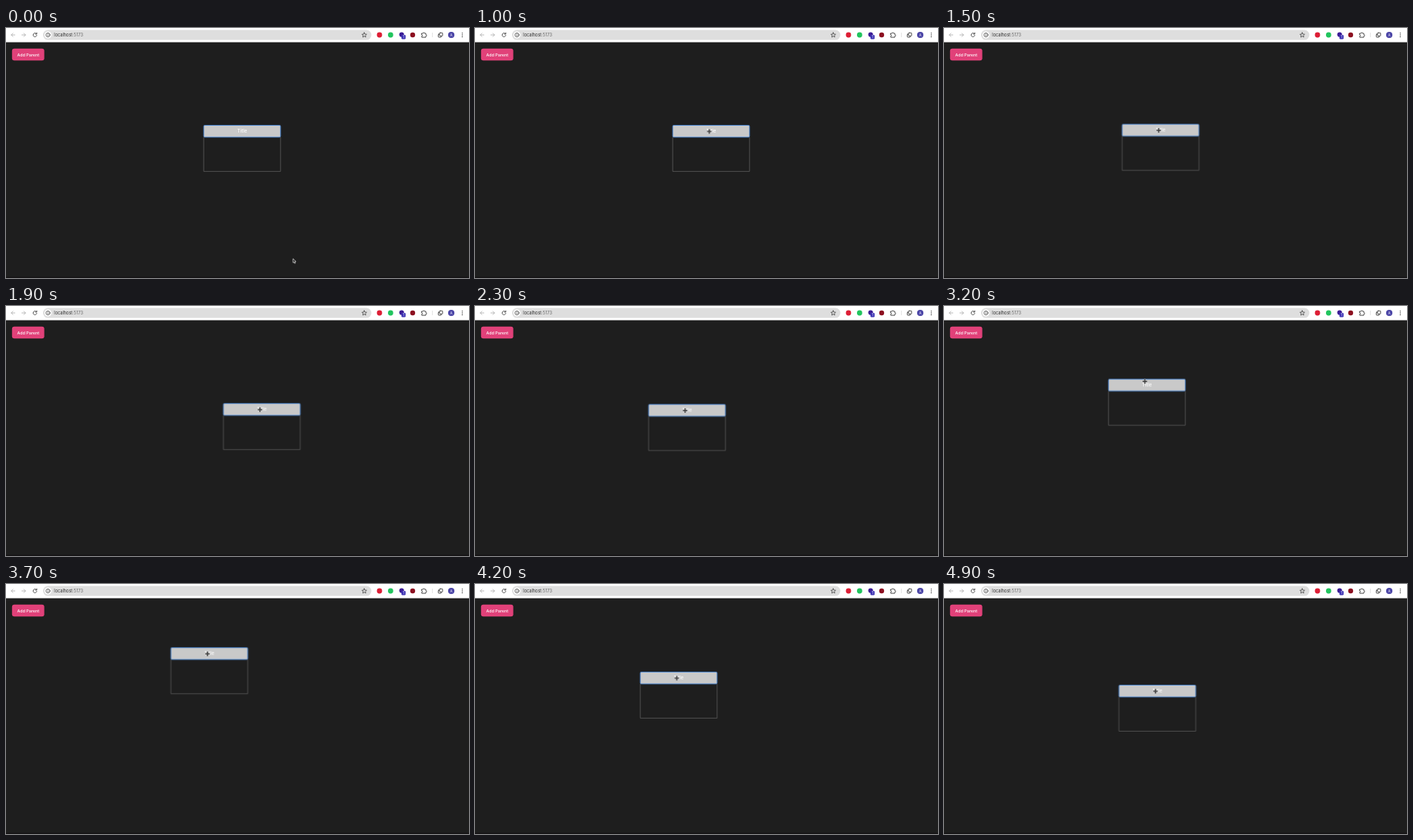
An HTML page for the animation above (5 s loop, 600 by 325 pixels).

```html
<!DOCTYPE html>
<html lang="en">
<head>
<meta charset="utf-8">
<title>Draggable panel</title>
<style>
  html, body { margin: 0; width: 100%; height: 100%; overflow: hidden; background: #1e1e1e; }
  svg { display: block; width: 600px; height: 325px; }
  text { font-family: Inter, Roboto, sans-serif; }
  .line { fill: none; stroke: #3c3c3c; stroke-width: .9; stroke-linecap: round; stroke-linejoin: round; }
  .faint { stroke: #b4b4b4; }

  #panel { animation: drag 5s infinite; }
  #arrow { animation: approach 5s infinite, leave 5s step-end infinite; }
  #grip { animation: hold 5s step-end infinite; }

  @keyframes drag {
    0%   { transform: translate(256px, 126.3px); animation-timing-function: step-end; }
    22%  { transform: translate(256px, 126.3px); animation-timing-function: steps(4); }
    30%  { transform: translate(230.6px, 124.9px); animation-timing-function: step-end; }
    32%  { transform: translate(230.6px, 124.9px); animation-timing-function: steps(3); }
    38%  { transform: translate(281.5px, 126.5px); animation-timing-function: steps(3); }
    44%  { transform: translate(224.7px, 127.7px); animation-timing-function: step-end; }
    46%  { transform: translate(224.7px, 127.7px); animation-timing-function: steps(5); }
    56%  { transform: translate(214.7px, 105.7px); animation-timing-function: steps(2); }
    60%  { transform: translate(212.9px, 99.3px); animation-timing-function: step-end; }
    64%  { transform: translate(212.9px, 94.9px); animation-timing-function: steps(1); }
    66%  { transform: translate(213px, 89.5px); animation-timing-function: steps(4); }
    74%  { transform: translate(213.5px, 82.5px); animation-timing-function: steps(5); }
    84%  { transform: translate(213.9px, 114.2px); animation-timing-function: steps(1); }
    86%  { transform: translate(214.2px, 114.8px); animation-timing-function: steps(6); }
    98%, 100% { transform: translate(226.5px, 131.2px); }
  }
  @keyframes approach {
    0%  { transform: translate(372px, 299.8px); animation-timing-function: steps(2); }
    4%  { transform: translate(325.6px, 207.6px); animation-timing-function: step-end; }
    6%  { transform: translate(325.6px, 207.6px); animation-timing-function: steps(4); }
    14%, 100% { transform: translate(303.5px, 134.5px); }
  }
  @keyframes leave {
    0% { opacity: 1; }
    14%, 100% { opacity: 0; }
  }
  @keyframes hold {
    0%  { opacity: 0; transform: translate(47.6px, 8.2px); }
    14% { opacity: 1; transform: translate(47.6px, 8.2px); }
    64% { opacity: 1; transform: translate(47.4px, 3.1px); }
    66%, 100% { opacity: 1; transform: translate(47.6px, 8.2px); }
  }
</style>
</head>
<body>
<svg viewBox="0 0 600 325">
  <rect width="600" height="325" fill="#1e1e1e"/>
  <rect y="323.5" width="600" height="1.5" fill="#151314"/>

  <!-- Browser toolbar -->
  <rect width="600" height="18.5" fill="#fff"/>
  <rect x="48" y="2.6" width="425.5" height="13" rx="6.5" fill="#dedede"/>
  <path class="line faint" d="M11.5 9H6.8M8.9 6.9 6.8 9l2.1 2.1M20.6 9h4.7M23.2 6.9 25.3 9l-2.1 2.1"/>
  <path class="line" d="M39.3 7.3A2.4 2.4 0 1 0 39.9 9.6M39.9 6.2v1.7h-1.7"/>
  <circle cx="54.4" cy="9" r="4.6" fill="#fff"/>
  <circle class="line" cx="54.4" cy="9" r="2.6" style="stroke-width:.75"/>
  <path class="line" d="M54.4 8.9v1.3M54.4 7.6v.05" style="stroke-width:.75"/>
  <text x="62.3" y="11.1" font-size="5.6" fill="#2e2e2e">localhost<tspan fill="#666">:5173</tspan></text>
  <path class="line" style="stroke-width:.75" d="M464.3 6l.9 2 2.2.2-1.7 1.5.5 2.2-1.9-1.2-1.9 1.2.5-2.2-1.7-1.5 2.2-.2z"/>

  <circle cx="484" cy="9" r="3.4" fill="#dd1f36"/>
  <circle cx="498.4" cy="9" r="3.4" fill="#21c45d"/>
  <circle cx="512.7" cy="8.6" r="3.1" fill="#3b1c96"/>
  <rect x="512.5" y="9" width="5.3" height="5.4" rx="1.2" fill="#3f35b4"/>
  <text x="515.1" y="13.4" font-size="4.4" text-anchor="middle" fill="#fff">1</text>
  <circle cx="527" cy="9" r="3.2" fill="#8c1020"/>
  <path class="line" d="M538.8 7h1.7a1 1 0 0 1 2 0h1.5v1.6a1 1 0 0 1 0 2v1.5h-5.2v-1.6a.9.9 0 0 0 0-1.8z"/>
  <path d="M552.5 6v6" stroke="#d8d8d8" stroke-width=".7"/>
  <rect class="line" x="560.2" y="8" width="4" height="4" rx=".8"/>
  <rect class="line" x="561.8" y="6.3" width="4" height="4" rx=".8" style="fill:#fff"/>
  <circle cx="577" cy="9" r="4.1" fill="#4b45a6"/>
  <text x="577" y="10.7" font-size="4.5" text-anchor="middle" fill="#e4e2f5">A</text>
  <g fill="#3c3c3c">
    <circle cx="591.3" cy="6.6" r=".7"/><circle cx="591.3" cy="9" r=".7"/><circle cx="591.3" cy="11.4" r=".7"/>
  </g>

  <!-- Page -->
  <rect x="7.8" y="26.7" width="41.8" height="15.6" rx="3" fill="#e14179"/>
  <text x="28.8" y="36.5" font-size="5.4" font-weight="500" text-anchor="middle" fill="#fff">Add Parent</text>

  <g id="panel">
    <path d="M.2 15.5V60.1H99.8V15.5" fill="none" stroke="#666" stroke-width=".7"/>
    <rect x=".2" y=".2" width="99.6" height="15.4" rx="1.4" fill="#c9c9c9" stroke="#4786d6" stroke-width=".9"/>
    <text x="50" y="10.2" font-size="6" font-weight="500" text-anchor="middle" fill="#fff">Title</text>
    <g id="grip">
      <path d="M0-3.2 1.3-1.7H.5V-.5H1.7V-1.3L3.2 0 1.7 1.3V.5H.5V1.7H1.3L0 3.2-1.3 1.7H-.5V.5H-1.7V1.3L-3.2 0-1.7-1.3V-.5H-.5V-1.7H-1.3z"
            fill="#111" stroke="#fff" stroke-width=".8" paint-order="stroke" stroke-linejoin="round"/>
    </g>
  </g>

  <g id="arrow">
    <path d="M0 0V5.3L1.2 4.2 2 6.1 3 5.7 2.2 3.9H3.8z" fill="#111" stroke="#eee" stroke-width=".7" stroke-linejoin="round"/>
  </g>
</svg>
</body>
</html>
```
